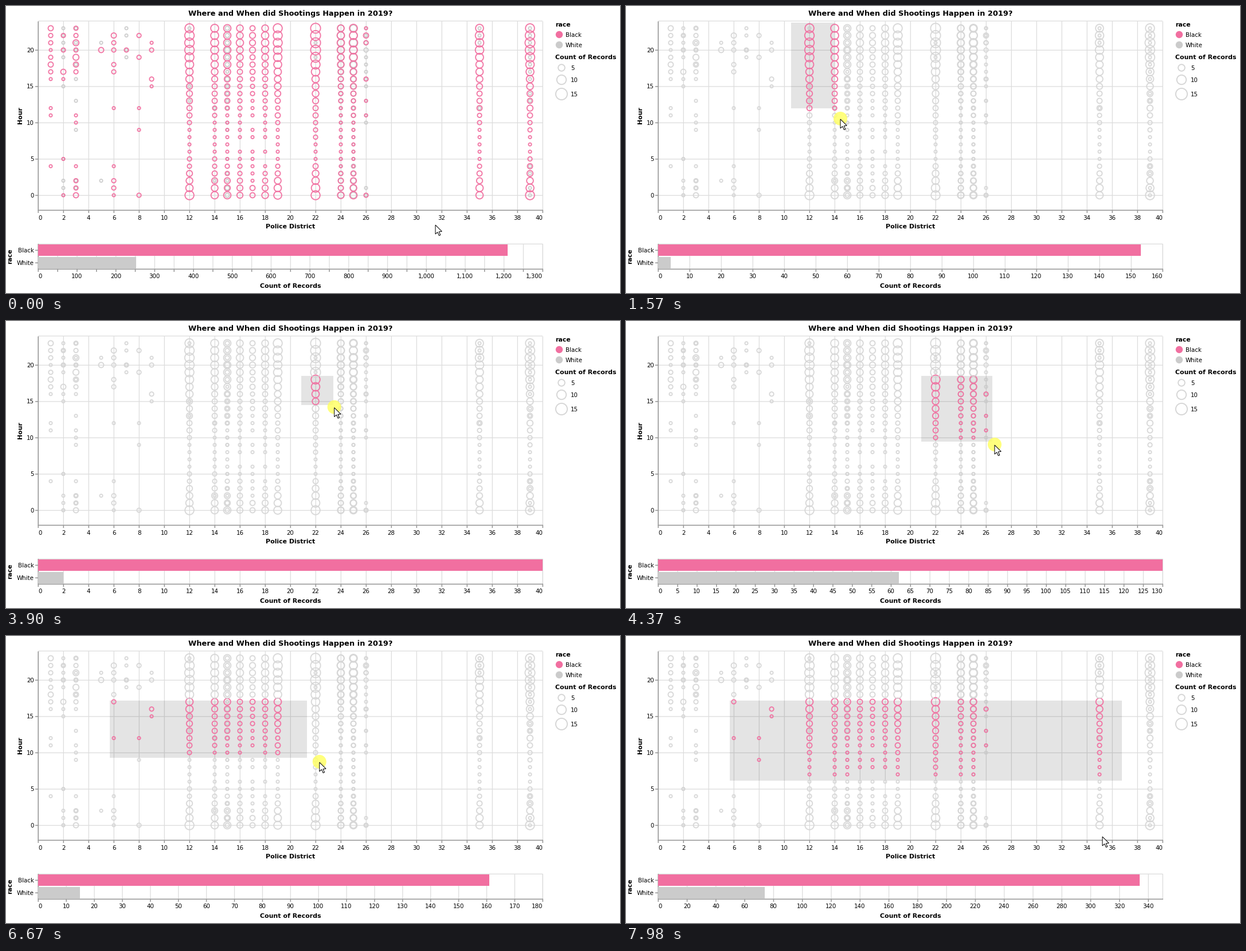
Animation, 1071 px wide and 502 px high, one loop 8 s. Source, as a matplotlib script:

```python
import math
import random

import numpy as np
import matplotlib.pyplot as plt
from matplotlib.animation import FuncAnimation
from matplotlib.collections import LineCollection
from matplotlib.patches import Circle, Polygon, Rectangle

W, H, DPI = 1071, 502, 64
PT = 72 / DPI                       # points per pixel
LOOP, STEP = 8000, 40

PINK, GRAY, DIM = "#f16fa0", "#cbcbcb", "#d6d6d6"
GRID, AXIS = "#dddddd", "#999999"
LEFT, RIGHT = 56, 936
BLACK, WHITE = 0, 1

plt.rcParams["font.family"] = "DejaVu Sans"
fig = plt.figure(figsize=(W / DPI, H / DPI), dpi=DPI, facecolor="white")
ax = fig.add_axes([0, 0, 1, 1])
ax.set_xlim(0, W)
ax.set_ylim(H, 0)
ax.axis("off")


def px(district):
    return LEFT + 22 * district


def py(hour):
    return 331 - 12.7 * hour


def label(x, y, text="", size=10.3, ha="center", **kw):
    return ax.text(x, y + 0.36 * size, text, fontsize=size * PT, ha=ha,
                   va="baseline", color="black", **kw)


def lines(segments, color, width=1.3):
    return ax.add_collection(LineCollection(
        segments, colors=color, linewidths=width * PT, snap=False, zorder=1))


def vline(x, top, bottom):
    return [(x + 0.3, top), (x + 0.3, bottom)]


def hline(y, left, right):
    return [(left, y + 0.3), (right, y + 0.3)]


# ---- records: a daily rhythm scaled by how busy each district is

BUSY = {12: 121, 14: 89, 15: 78, 16: 64, 17: 44, 18: 66,
        19: 109, 22: 139, 24: 68, 25: 92, 35: 98, 39: 127}
WHITE_TOTALS = {2: 12, 3: 8, 5: 3, 7: 5, 12: 5, 14: 4, 15: 30,
                22: 6, 24: 62, 25: 73, 26: 16, 35: 4, 39: 13}
QUIET = {1: [*range(16, 24), 12, 11, 4], 2: [22, 20, 17, 16, 5, 0],
         3: [*range(17, 24), 11, 10, 4, 2, 1, 0], 5: [20],
         6: [*range(20, 23), 18, 17, 12, 4, 2, 1, 0], 7: [20],
         8: [22, 19, 12, 9, 0], 9: [21, 20, 16, 15],
         26: [23, 22, 21, 16, 13, 11, 0]}


def rhythm(hour):
    """Relative activity, peaking late in the evening, with mean 1."""
    turn = 2 * math.pi / 24
    return (1 + 0.85 * math.cos(turn * (hour - 20.5))
            + 0.2 * math.cos(2 * turn * (hour - 22)))


def make_records():
    rng = random.Random(19)
    for group, totals in ((WHITE, WHITE_TOTALS), (BLACK, BUSY)):
        for d, total in totals.items():
            for h in range(24):
                yield d, h, int(total * rhythm(h) / 24 + rng.random()), group
    for d, active in QUIET.items():
        for h in active:
            yield d, h, int(1 + 1.9 * rhythm(h) * rng.random()), BLACK


records = np.array([r for r in make_records() if r[2]])
xs, ys = px(records[:, 0]), py(records[:, 1])
counts, groups = records[:, 2], records[:, 3]

# ---- scatter plot

TOP, BOTTOM = 27, 357
districts = range(0, 41, 2)
hours = range(0, 21, 5)
lines([vline(px(d), TOP, BOTTOM) for d in districts]
      + [hline(py(h), LEFT, RIGHT) for h in hours]
      + [hline(TOP - 1, LEFT, RIGHT)], GRID)
lines([vline(px(d), BOTTOM, BOTTOM + 5) for d in districts]
      + [hline(py(h), LEFT - 5, LEFT) for h in hours]
      + [vline(LEFT, TOP, BOTTOM + 1), hline(BOTTOM, LEFT, RIGHT + 1)],
      AXIS, 1.6)


def place_tick(text, x, value):
    """Keep the outermost tick labels inside the plot."""
    side = "left" if x <= LEFT else "right" if x >= RIGHT - 0.5 else "center"
    text.set_x(x)
    text.set_ha(side)
    text.set_text(value)


for d in districts:
    place_tick(label(0, 370), px(d), str(d))
for h in hours:
    label(49, py(h), str(h), ha="right")

BOLD = dict(weight="bold")
label(496, 12.4, "Where and When did Shootings Happen in 2019?", 12.83, **BOLD)
label(496, 385, "Police District", 10.96, **BOLD)
label(496, 489, "Count of Records", 10.96, **BOLD)
for x, y, name in ((25, 191, "Hour"), (7, 438, "race")):
    ax.text(x, y, name, rotation=90, fontsize=10.96 * PT, ha="center",
            va="center", **BOLD)

brush = ax.add_patch(Rectangle((0, 0), 1, 1, fc=(0.2, 0.2, 0.2, 0.13),
                               ec="none", zorder=2))
dots = ax.scatter(xs, ys, s=(5.2 * PT) ** 2 * counts, facecolors="none",
                  linewidths=1.9 * PT, alpha=0.92, zorder=3)

# ---- legend

label(958, 32, "race", 10.96, ha="left", **BOLD)
for y, name, color in ((50, "Black", PINK), (68, "White", GRAY)):
    ax.add_patch(Circle((965, y), 6.2, fc=color, ec="none"))
    label(976, y, name, ha="left")
label(958, 89, "Count of Records", 10.96, ha="left", **BOLD)
for y, n in ((108, 5), (129, 10), (154, 15)):
    ax.add_patch(Circle((969, y), 2.6 * math.sqrt(n), fc="none", ec=DIM,
                        lw=1.9 * PT))
    label(985, y, str(n), ha="left")

# ---- bar chart

BAR_TOP, BAR_BOTTOM = 416, 460
bar_grid = lines([], GRID)
bar_ticks = lines([], AXIS, 1.6)
lines([hline(BAR_TOP, LEFT, RIGHT), vline(RIGHT, BAR_TOP, BAR_BOTTOM)], GRID)
lines([vline(LEFT, BAR_TOP, BAR_BOTTOM + 1),
       hline(BAR_BOTTOM, LEFT, RIGHT + 1),
       hline(427, LEFT - 5, LEFT), hline(449, LEFT - 5, LEFT)], AXIS, 1.6)
label(49, 427, "Black", ha="right")
label(49, 449, "White", ha="right")
bars = [ax.add_patch(Rectangle((LEFT, y), 0, 19.8, fc=c, ec="none", zorder=2))
        for y, c in ((417, PINK), (439, GRAY))]
bar_labels = [label(0, 472) for _ in range(40)]


def tick_step(span, count):
    raw = span / count
    power = 10 ** math.floor(math.log10(raw))
    error = raw / power
    factor = (10 if error >= 50 ** 0.5 else 5 if error >= 10 ** 0.5
              else 2 if error >= 2 ** 0.5 else 1)
    return factor * power


def draw_bars(totals):
    top = max(*totals, 1)
    nice = tick_step(top, 10)
    top = math.ceil(top / nice - 1e-9) * nice
    step = tick_step(top, 22)
    scale = (RIGHT - LEFT) / top
    for bar, total in zip(bars, totals):
        bar.set_width(total * scale)

    values = [i * step for i in range(int(top / step + 1e-6) + 1)]
    spots = [LEFT + v * scale for v in values]
    bar_grid.set_segments([vline(x, BAR_TOP, BAR_BOTTOM) for x in spots])
    bar_ticks.set_segments([vline(x, BAR_BOTTOM, BAR_BOTTOM + 5)
                            for x in spots])

    names = [f"{v:,.1f}" if step < 1 else f"{v:,.0f}" for v in values]
    crowded = 1.5 * 6.6 * len(names[-1]) > step * scale
    for i, text in enumerate(bar_labels):
        shown = i < len(values) and not (crowded and i % 2)
        text.set_visible(shown)
        if shown:
            place_tick(text, spots[i], names[i])


# ---- pointer

ARROW = np.array([(0, 0), (0, 16), (3.7, 12.6), (6.4, 18.6), (8.8, 17.5),
                  (6.2, 11.8), (11.3, 11.3)])
halo = ax.add_patch(Circle((0, 0), 12, fc="#ffff66", ec="none", alpha=0.85,
                           zorder=5))
arrow = ax.add_patch(Polygon(ARROW, fc="white", ec="black", lw=PT, zorder=6))

# The screen refreshes in bursts: start, end, number of updates.
BURSTS = ((80, 790, 9), (900, 1670, 9), (1750, 2130, 5), (2300, 2390, 2),
          (2580, 3330, 9), (3430, 4170, 9), (4250, 4630, 5), (4810, 4910, 2),
          (5190, 5940, 9), (6020, 6750, 9), (6870, 7230, 5), (7490, 7980, 6))
UPDATES = np.concatenate([[0]] + [np.linspace(*b) for b in BURSTS])

# Pointer key points: time, x, y.
PATH = ((60, 749, 382), (790, 288, 32), (996, 288, 30), (1574, 374, 197),
        (2130, 428, 338), (2580, 429, 338), (3150, 545, 95), (3430, 515, 97),
        (3522, 515, 97), (4345, 643, 216), (5190, 643, 216), (6111, 182, 113),
        (6250, 182, 113), (6659, 547, 220), (7230, 868, 246), (7580, 866, 260),
        (7980, 831, 350))
PRESSES = ((900, 2380), (3430, 4900), (6110, 7580))

# Brush key points: time, corner x, corner y, records of each group inside.
# The first point of a drag is its fixed corner.
DRAGS = (
    ((996, 288, 29, 0, 0), (1574, 364.5, 179, 153, 4), (2130, 428, 340, 352, 41)),
    ((3522, 515, 96, 0, 0), (3900, 572, 148, 41, 2), (4345, 638.5, 211, 130, 62),
     (4810, 643, 211, 130, 62)),
    ((6294, 181, 113, 0, 0), (6659, 525, 213, 161, 15),
     (7230, 865, 241, 320, 73), (7490, 865, 253, 334, 74)),
)
ALL_TOTALS = 1210, 252


def along(keys, t):
    times, *tracks = zip(*keys)
    return [np.interp(t, times, track) for track in tracks]


def brush_state(t):
    """Brush rectangle, or None, and the group totals it holds."""
    for drag in reversed(DRAGS):
        start, x0, y0 = drag[0][:3]
        if start <= t:
            x1, y1, *totals = along(drag, t)
            if x1 - x0 > 1 and y1 - y0 > 1:
                return (x0, y0, x1, y1), [round(n) for n in totals]
            break
    return None, ALL_TOTALS


def draw(frame):
    now = frame * STEP + 30
    t = UPDATES[np.searchsorted(UPDATES, now, "right") - 1]

    box, totals = brush_state(t)
    brush.set_visible(box is not None)
    picked = np.ones(len(xs), bool)
    if box:
        x0, y0, x1, y1 = box
        brush.set_bounds(x0, y0, x1 - x0, y1 - y0)
        picked = (xs >= x0) & (xs <= x1) & (ys >= y0) & (ys <= y1)
    dots.set_edgecolor([(PINK if g == BLACK else GRAY) if p else DIM
                        for g, p in zip(groups, picked)])
    draw_bars(totals)

    x, y = along(PATH, t)
    arrow.set_xy(ARROW + (x, y + 1))
    halo.center = x, y
    halo.set_visible(any(a <= t < b for a, b in PRESSES))
    return []


anim = FuncAnimation(fig, draw, frames=LOOP // STEP, interval=STEP,
                     init_func=lambda: [], repeat=True, repeat_delay=0)
plt.show()
```
